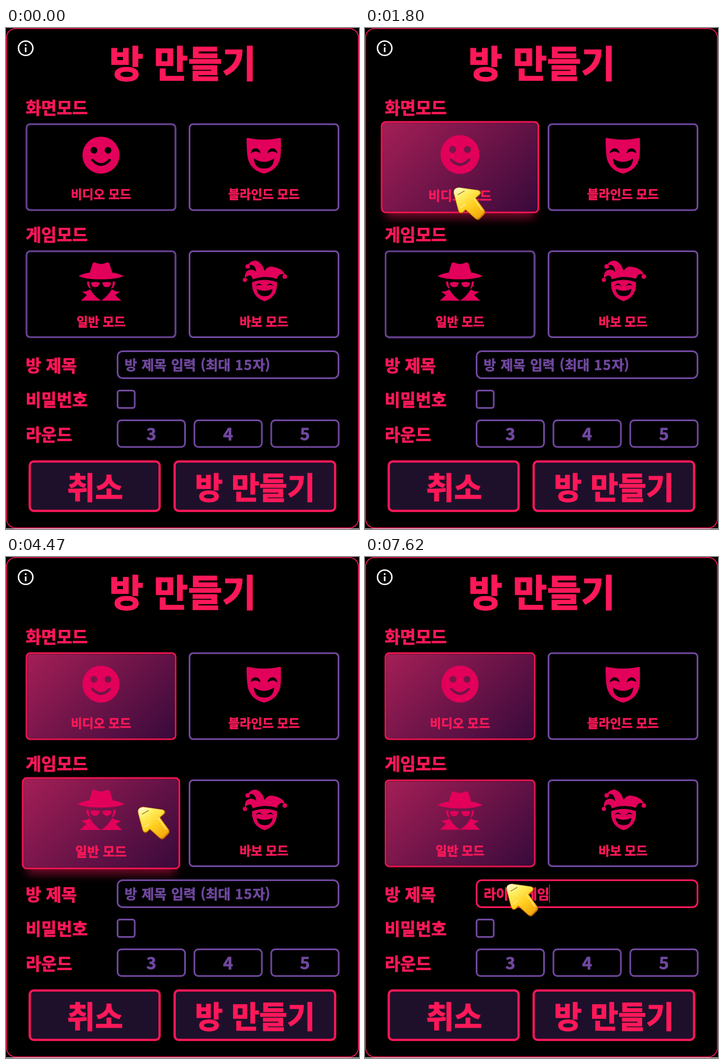
An HTML page that plays this animation: 628x892 px, repeating every 8 s.

```html
<!DOCTYPE html>
<html lang="ko">
<head>
<meta charset="utf-8">
<title>방 만들기</title>
<style>
  :root { --pink: #ff1859; --purple: #70489f; --icon: #e2005a; }
  html, body { margin: 0; width: 100%; height: 100%; overflow: hidden; background: #000; }
  svg { display: block; width: 628px; height: 892px; }
  text {
    font-family: "Noto Sans CJK KR", "Noto Sans CJK", sans-serif;
    font-weight: 900;
    font-size: 30px;
    fill: var(--pink);
    stroke: var(--pink);
    stroke-width: .025em;
    white-space: pre;
  }
  .mid { text-anchor: middle; }
  .title { font-size: 66px; }
  .action { font-size: 54px; }
  .name { font-size: 22px; }
  .field { font-size: 24px; }
  .hint, .round { fill: var(--purple); stroke: var(--purple); }
  .hint { word-spacing: 1.5px; }
  .box { fill: #000; stroke: var(--purple); stroke-width: 3; }
  .button { fill: #1e102b; stroke: var(--pink); stroke-width: 4; }
  .icon { fill: var(--icon); fill-rule: evenodd; }
  .tint { fill: url(#tint); opacity: 0; }
  .shadow { fill: var(--pink); filter: blur(8px); opacity: 0; }

  .card { transform-origin: 132.5px 76.5px; }
  .video, .video *, .normal, .normal *, .cursor, .press, .input, .caret {
    animation-duration: 8s;
    animation-iteration-count: infinite;
    animation-timing-function: linear;
  }
  .video { animation-name: videoGrow; }
  .video .box { animation-name: videoBorder; }
  .video .shadow { animation-name: videoShadow; }
  .video .tint { animation-name: videoPick; animation-timing-function: step-end; }
  .normal { animation-name: normalGrow; }
  .normal .box { animation-name: normalBorder; }
  .normal .shadow { animation-name: normalShadow; }
  .normal .tint { animation-name: normalPick; animation-timing-function: step-end; }
  .cursor { animation-name: travel; }
  .press { animation-name: press; animation-timing-function: step-end; }
  .input { animation-name: focus; animation-timing-function: step-end; }
  .caret { animation-name: caret; animation-timing-function: step-end; }

  @keyframes videoGrow {
    0%, 10.25% { transform: none; animation-timing-function: ease; }
    13.9%, 33.4% { transform: scale(1.05); animation-timing-function: ease; }
    36.5%, 100% { transform: none; }
  }
  @keyframes videoBorder {
    0%, 10.25% { stroke: var(--purple); }
    13.9%, 100% { stroke: var(--pink); }
  }
  @keyframes videoShadow {
    0%, 10.25%, 36.5%, 100% { opacity: 0; }
    13.9%, 33.4% { opacity: .45; }
  }
  @keyframes videoPick { 0% { opacity: 0; } 15.625%, 100% { opacity: 1; } }
  @keyframes normalGrow {
    0%, 37% { transform: none; animation-timing-function: ease; }
    40.7%, 57.5% { transform: scale(1.05); animation-timing-function: ease; }
    60.8%, 100% { transform: none; }
  }
  @keyframes normalBorder {
    0%, 37% { stroke: var(--purple); }
    40.7%, 100% { stroke: var(--pink); }
  }
  @keyframes normalShadow {
    0%, 37%, 60.8%, 100% { opacity: 0; }
    40.7%, 57.5% { opacity: .45; }
  }
  @keyframes normalPick { 0% { opacity: 0; } 50.875%, 100% { opacity: 1; } }
  @keyframes travel {
    0%, 4.125% { transform: translate(630px, 893px); animation-timing-function: ease-in-out; }
    13.1%, 30% { transform: translate(157px, 283px); animation-timing-function: ease-in; }
    33.25% { transform: translate(232px, 332px); animation-timing-function: ease-out; }
    40.8%, 55.875% { transform: translate(234px, 444px); animation-timing-function: ease-in-out; }
    60.9%, 70.125% { transform: translate(255px, 584px); }
    71.75%, 100% { transform: translate(251px, 581px); }
  }
  @keyframes press {
    0%, 15.625%, 50.875%, 66.75%, 100% { transform: none; }
    14%, 48.5%, 65.125% { transform: translate(11px, 12px); }
  }
  @keyframes focus { 0% { stroke: var(--purple); } 66.75%, 100% { stroke: var(--pink); } }
  @keyframes caret { 0% { opacity: 0; } 66.75%, 100% { opacity: 1; } }
</style>
</head>
<body>
<svg viewBox="0 0 628 892">
  <defs>
    <linearGradient id="tint" gradientUnits="userSpaceOnUse" x1="28" y1="-28" x2="237" y2="181">
      <stop stop-color="#a51f57"/>
      <stop offset="1" stop-color="#380a3b"/>
    </linearGradient>
    <linearGradient id="gold" x1=".1" y1="0" x2=".8" y2="1">
      <stop stop-color="#fffbd0"/>
      <stop offset=".25" stop-color="#ffee62"/>
      <stop offset=".6" stop-color="#ffd021"/>
      <stop offset="1" stop-color="#f3a70a"/>
    </linearGradient>
    <path id="arrow" d="M10 1L45 6Q51 8 48 13L40 20L56 42Q58 46 55 49L47 57Q44 60 40 57L22 41L17 46Q11 49 9 42L1 12Q-1 2 10 1z"/>
  </defs>

  <rect x="1" y="1" width="626" height="889" rx="16" fill="#000" stroke="var(--pink)" stroke-width="1.6"/>
  <rect y="891" width="628" height="1" fill="#eee"/>
  <circle cx="35" cy="36" r="12.8" fill="none" stroke="#fff" stroke-width="2.6"/>
  <path d="M35 29v3M35 34.5v8.5" stroke="#fff" stroke-width="2.8"/>

  <text class="mid title" x="314.5" y="88">방 만들기</text>
  <text x="35" y="152.5">화면모드</text>
  <text x="35" y="378.5">게임모드</text>
  <text x="35" y="611.5">방 제목</text>
  <text x="35" y="672.5">비밀번호</text>
  <text x="35" y="734.5">라운드</text>

  <g id="cards"></g>

  <rect class="box input" x="198.5" y="575.5" width="393" height="48" rx="9"/>
  <text class="field hint" id="hint" x="211" y="609">방 제목 입력 (최대 <tspan letter-spacing="1.5">15</tspan>자)</text>
  <text class="field" id="typed" x="211" y="609"></text>
  <rect class="caret" id="caret" y="583" width="1.3" height="33" fill="var(--pink)"/>

  <rect class="box" x="198.5" y="645.5" width="30.5" height="31" rx="4"/>
  <g id="rounds"></g>

  <rect class="button" x="42.25" y="771.75" width="231" height="88" rx="7"/>
  <text class="mid action" x="158.5" y="839">취소</text>
  <rect class="button" x="300" y="771.75" width="285.5" height="88" rx="7"/>
  <text class="mid action" x="443" y="839">방 만들기</text>

  <g class="cursor"><g class="press">
    <use href="#arrow" fill="#c87908" stroke="#a85c08" stroke-width="1"/>
    <use href="#arrow" fill="url(#gold)" transform="translate(.6 .2) scale(.96)"/>
    <path d="M8 14L20 7" stroke="#5b4310" stroke-width="1"/>
    <path d="M37 21L51 41M13 37L21 31" fill="none" stroke="#fff3a0" stroke-width="2" stroke-linecap="round" opacity=".7"/>
  </g></g>
</svg>
<script>
  const byId = id => document.getElementById(id);
  const dot = (x, y, r) => `M${x - r} ${y}a${r} ${r} 0 1 0 ${2 * r} 0a${r} ${r} 0 1 0 ${-2 * r} 0z`;

  const spyHalf = 'M-18 1Q-10-2-2 1Q-4 9-10 9Q-17 9-18 1z' +
    'M-25-1L-21-1Q-21 6-18 12Q-25 9-25-1z' +
    'M-36 33L-25 23L-34 17Q-26 17-19 13Q-12 25 0 33z';
  const icons = {
    smile: `<path d="${dot(0, 0, 33)}${dot(-12.5, -8.5, 6)}${dot(12.5, -8.5, 6)}
      M-18 9Q-16 5-13 8Q0 21 13 8Q16 5 18 9Q0 30-18 9z"/>`,
    mask: `<path d="M-31-29Q-30-32-26-30Q0-25 25-30Q30-32 30-29Q31-8 29 5Q24 27 0 33Q-24 27-29 5Q-31-8-31-29z
      M-24-3Q-22-12-15-12Q-8-12-6-3Q-15-10-24-3z M6-3Q8-12 15-12Q22-12 24-3Q15-10 6-3z
      M-18 6Q0 18 18 6Q17 24 0 24Q-17 24-18 6z"/>`,
    spy: `<path d="M-40-11Q-30-16-20-17L-15-33Q-13-37-8-34Q0-31 8-34Q13-37 15-33L20-17Q30-16 40-11Q28-5 0-5Q-28-5-40-11z"/>
      <path d="${spyHalf}"/><path d="${spyHalf}" transform="scale(-1 1)"/>`,
    jester: `<path d="M-20-5Q-23-18-34-7Q-35-20-25-22Q-19-23-14-18Q-15-34-29-30Q-23-40-13-38Q-3-34 1-20Q7-30 17-27Q34-24 37-13Q27-18 23-6Q1-13-20-5z"/>
      <path d="${dot(-34, -4, 3.8)}"/><path d="${dot(-29, -28, 4)}"/><path d="${dot(37, -10, 4)}"/>
      <path d="M-21 0Q1-8 23 0Q25 26 1 34Q-23 26-21 0z
      M-15 7Q-9-2-3 7Q-9 3-15 7z M5 7Q11-2 17 7Q11 3 5 7z M-13 12Q1 19 15 12Q14 25 1 25Q-12 25-13 12z"/>`
  };

  const card = (x, y, icon, label, kind = '') => `
    <g transform="translate(${x} ${y})"><g class="card ${kind}">
      <rect class="shadow" x="6" y="20" width="253" height="143" rx="6"/>
      <rect class="box" width="265" height="153" rx="6.5"/>
      <rect class="tint" x="1.5" y="1.5" width="262" height="150" rx="5"/>
      <g class="icon" transform="translate(132.5 55)">${icons[icon]}</g>
      <text class="mid name" x="132.5" y="133">${label}</text>
    </g></g>`;
  byId('cards').innerHTML =
    card(36.5, 171.25, 'smile', '비디오 모드', 'video') +
    card(326.5, 171.25, 'mask', '블라인드 모드') +
    card(36.5, 397.5, 'spy', '일반 모드', 'normal') +
    card(326.5, 397.5, 'jester', '바보 모드');

  byId('rounds').innerHTML = [3, 4, 5].map((n, i) => `
    <rect class="box" x="${198.5 + 136.7 * i}" y="698.5" width="120" height="47.5" rx="7"/>
    <text class="mid round" x="${258.5 + 136.7 * i}" y="734">${n}</text>`).join('');

  // Korean input composes syllable by syllable.
  const typing = [
    [0, ''], [6140, 'ㄹ'], [6210, '라'], [6410, '랑'], [6540, '라이'], [6740, '라잍'],
    [6810, '라이트'], [7140, '라이트 게'], [7340, '라이트 겡'], [7410, '라이트 게이'], [7620, '라이트 게임']
  ];
  const typed = byId('typed');

  function draw(now) {
    const time = now % 8000;
    const value = typing.filter(([start]) => start <= time).pop()[1];
    typed.textContent = value;
    byId('hint').style.display = value ? 'none' : '';
    byId('caret').setAttribute('x', 211 + (value ? typed.getComputedTextLength() - .5 : 0));
    requestAnimationFrame(draw);
  }
  requestAnimationFrame(draw);
</script>
</body>
</html>
```
